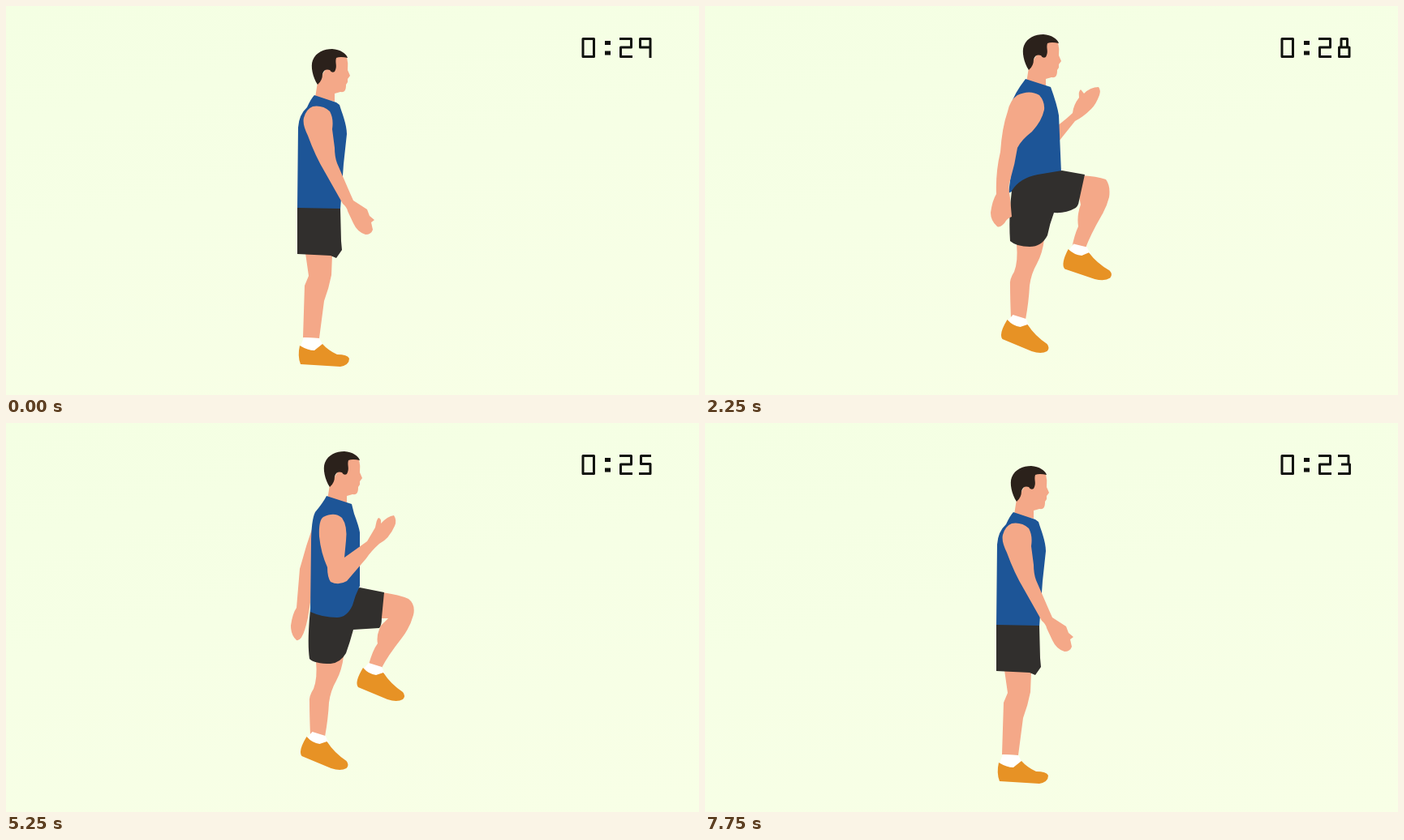
An HTML page for the animation above (8000 ms loop, 854 by 480 pixels).

```html
<!DOCTYPE html>
<html lang="en">
<head>
<meta charset="utf-8">
<title>High knees timer</title>
<style>
  html, body { margin: 0; width: 100%; height: 100%; overflow: hidden; }
  body { background: linear-gradient(168deg, #f4ffe3, #f6ffe5 45%, #f8ffe6); }
  svg { display: block; width: 854px; height: 480px; }
  .skin { fill: #f4a888; }
  .hair { fill: #2b211b; }
  .top { fill: #1d5597; }
  .shorts { fill: #312f2d; }
  .shoe { fill: #e79225; }
  .sock { fill: #fff; }
  .clock { fill: none; stroke: #11130f; stroke-width: 3; stroke-linejoin: round; }

  .pose { visibility: hidden; animation: 2s step-end infinite; }
  .stand { animation-name: stand; }
  .kneeA { animation-name: kneeA; }
  .kneeB { animation-name: kneeB; }
  @keyframes stand {
    0%, 37.5%, 87.5% { visibility: visible; }
    12.5%, 62.5% { visibility: hidden; }
  }
  @keyframes kneeA {
    0%, 37.5% { visibility: hidden; }
    12.5% { visibility: visible; }
  }
  @keyframes kneeB {
    0%, 87.5% { visibility: hidden; }
    62.5% { visibility: visible; }
  }

  /* each second lasts 1.25 s, the last one is cut short by the loop */
  .sec path { visibility: hidden; animation: sec 8s step-end calc(var(--i) * 1.25s) infinite; }
  .sec .last { animation: last 8s step-end infinite; }
  @keyframes sec {
    0% { visibility: visible; }
    15.625%, 100% { visibility: hidden; }
  }
  @keyframes last {
    0% { visibility: hidden; }
    93.75%, 100% { visibility: visible; }
  }
</style>
</head>
<body>
<svg viewBox="0 0 854 480">
  <defs>
    <g id="head">
      <path class="skin" d="M404 62L420 63Q422 71 421 79L424 86L421 90L421 94L419 97C419 103 418 107 412 106L405 108V118L381 113L384 94Z"/>
      <path class="hair" d="M384 97C378 88 375 74 378 67C382 57 392 53 402 53C412 54 419 58 421 64Q412 62 407 64C405 70 409 74 405 81Q401 83 399 79Q392 77 390 84Q390 92 384 97Z"/>
    </g>
    <g id="foot">
      <path class="sock" d="M447 296L463 301L467 309L457 314L440 304Z"/>
      <path class="shoe" d="M440 302Q447 310 456 311L465 308Q474 322 489 332Q493 337 489 341Q482 345 470 341L434 326Q429 320 440 302Z"/>
    </g>
    <path id="leg" class="skin" d="M382 294L416 288Q414 305 407 318Q400 330 398 345Q397 365 393 387L375 385Q374 360 374 345Q373 337 379 328Q384 315 382 294Z"/>
  </defs>

  <g class="pose stand">
    <use href="#head"/>
    <path class="skin" d="M369 305L402 307L401 332Q398 348 392 364L386 410L366 409L368 345L373 333Z"/>
    <path class="sock" d="M367 409L386 410L391 419L381 427L362 422Z"/>
    <path class="shoe" d="M362 419Q372 425 380 425L390 417Q397 425 408 430Q421 430 423 435Q423 443 412 445L363 442Q359 432 362 419Z"/>
    <path class="top" d="M380 110L407 119L411 122C414 132 420 146 420 158L416 195L412 251H359L360 150Q361 134 371 125Q376 114 380 110Z"/>
    <path class="shorts" d="M359 249L412 250L413 290L414 301L407 311L400 308L359 306Z"/>
    <path class="skin" d="M378 124Q390 122 399 130Q404 139 402 152L405 175Q405 186 408 194L424 231L428 240L445 251L448 259L454 264L450 267L452 276Q450 282 443 282Q433 279 428 268L421 253Q420 248 415 244L393 205Q381 185 372 160Q365 146 367 138Q370 127 378 124Z"/>
  </g>

  <g class="pose kneeA">
    <use href="#head" x="15" y="-18"/>
    <path class="skin" d="M434 148Q447 138 453 132Q454 122 461 113Q460 105 463 103L467 108Q475 100 485 100Q488 104 486 110Q482 121 476 127Q466 137 456 142L436 167Z"/>
    <use href="#leg" x="2"/>
    <use href="#foot" x="-67.5" y="85"/>
    <path class="skin" d="M463 209Q483 210 494 214Q500 222 498 236Q495 248 489 258Q475 282 468 301L452 299Q455 283 460 272Q458 258 463 245Q458 228 463 209Z"/>
    <use href="#foot" transform="translate(9 -3.5) rotate(-4 462 322)"/>
    <path class="top" d="M395 90L426 100Q434 122 436 135L439 206L410 212L374 231L378 200L382 165Q376 140 377 122Q381 108 395 90Z"/>
    <path class="shorts" d="M378 228Q388 212 410 208L440 203L468 208L461 240Q460 248 455 250Q445 256 430 255Q425 268 422 283Q415 297 400 297Q384 297 376 290Q374 260 378 228Z"/>
    <path class="skin" d="M385 110Q400 103 412 110Q419 118 418 128Q415 142 403 155Q390 165 385 175Q382 195 376 215Q373 222 376 237L378 260Q372 262 369 268Q363 274 360 272Q352 265 352 255Q354 240 359 232Q358 205 364 180Q366 150 373 130Q376 116 385 110Z"/>
  </g>

  <g class="pose kneeB">
    <use href="#head" x="15" y="-18"/>
    <path class="skin" d="M380 122L376 215L372 240Q366 270 358 268Q351 262 351 250Q353 235 358 228L362 180Q370 150 380 122Z"/>
    <use href="#leg"/>
    <use href="#foot" x="-69.5" y="85"/>
    <path class="skin" d="M464 209Q485 212 496 217Q505 224 502 237Q498 252 488 265Q470 288 463 302L447 298Q452 280 458 272Q456 262 462 250Q467 245 471 241L461 241Z"/>
    <use href="#foot"/>
    <path class="shorts" d="M375 230L436 203L466 209L463 240Q463 250 460 253L428 255Q424 270 419 284Q412 296 400 297Q380 297 374 291Q371 270 375 230Z"/>
    <path class="top" d="M395 90L426 100L429 112Q435 128 436 135V201Q430 213 427 225Q420 240 408 240Q390 240 375 233L376 150Q376 120 381 110Q391 98 395 90Z"/>
    <path class="skin" d="M391 116Q405 109 414 117Q421 127 419 145L417 166L445 146L455 129Q457 118 459 117Q463 118 462 124Q470 115 478 114Q482 120 479 127Q472 143 460 149Q450 158 444 167L420 195Q410 201 400 196Q396 190 396 178Q388 160 386 140Q385 120 391 116Z"/>
  </g>

  <g class="clock" role="img" aria-label="Countdown">
    <path d="M711 40.5H724.5V62.5H711Z"/>
    <path d="M738 45.5H745M738 58H745" stroke-width="5"/>
    <path d="M756 40.5H770.5V51H757.5V62.5H772"/>
    <g class="sec" transform="translate(780 39)">
      <path style="--i:0" d="M14 25V1.5H1.5V12H14"/>
      <path style="--i:1" d="M4 1.5H11.5V12H4ZM1.5 12H14V23.5H1.5Z"/>
      <path style="--i:2" d="M1.5 5V1.5H14.5V7L7.5 14V25"/>
      <path style="--i:3" d="M2 0V23.5H14V12H2"/>
      <path style="--i:4" d="M15 1.5H2.5V11.5H14V23.5H0"/>
      <path style="--i:5" d="M4 0L1.5 15.5H16M12.5 9V25"/>
      <path class="last" d="M0 1.5H13V12H4M12 12H14.5V23.5H0"/>
    </g>
  </g>
</svg>
</body>
</html>
```
